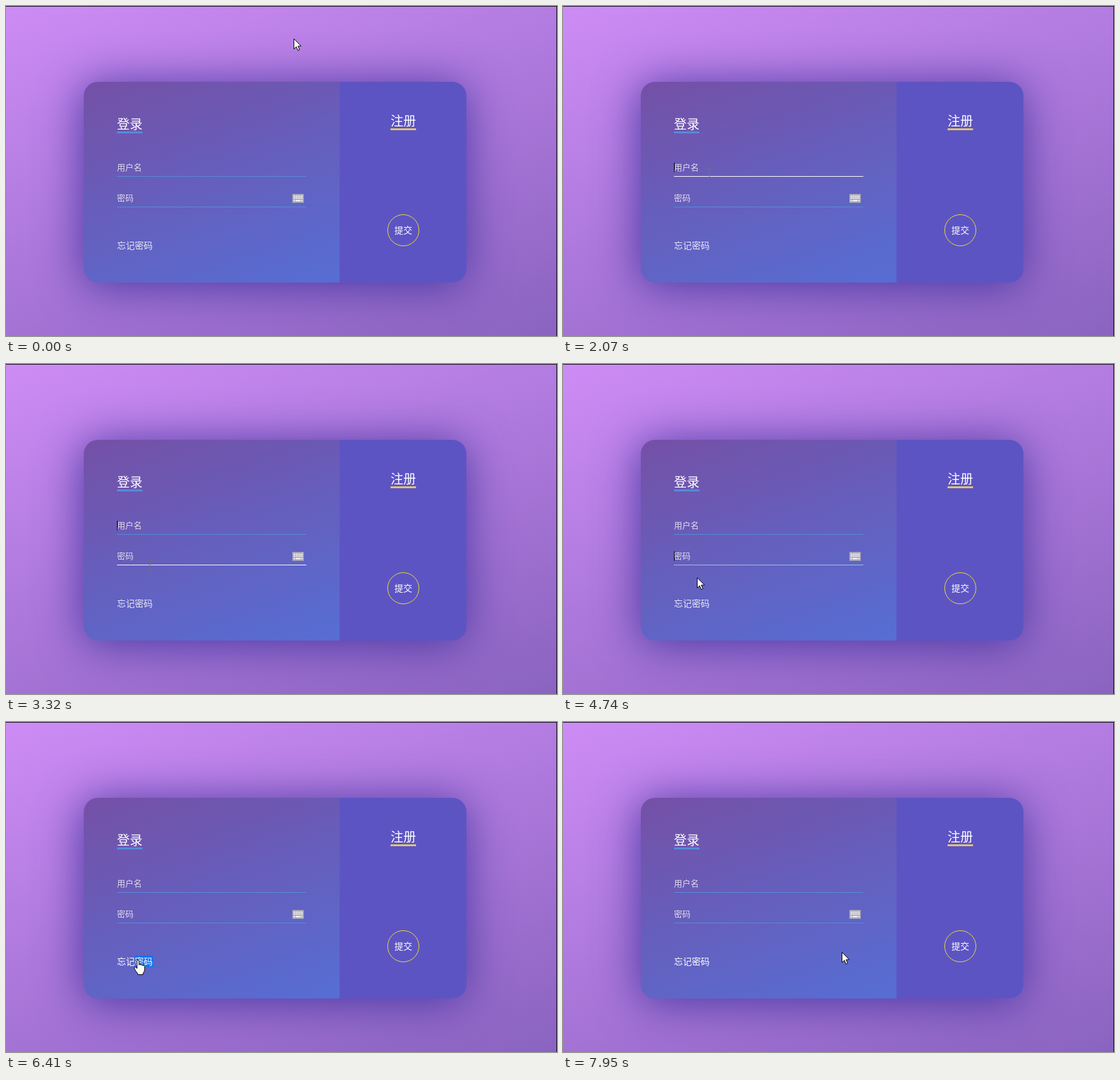
Write an HTML page that moves like this. It is 864 by 518 pixels and loops after 7990 ms.

```html
<!DOCTYPE html>
<html lang="zh-CN">
<head>
<meta charset="utf-8">
<title>登录</title>
<style>
html, body { margin: 0; width: 100%; height: 100%; overflow: hidden; }
body { position: relative; background: linear-gradient(160deg, #cd8cf5, #8a63c0); }
body::after { content: ""; position: absolute; inset: 0; border: solid #120c1c; border-width: 1px 1px 0 0; }
.card {
  position: absolute; left: 122px; top: 119px; width: 600px; height: 315px; border-radius: 22px;
  background: linear-gradient(160deg, #7550a6, #566ed4) 0 0 / 401px 100% no-repeat, #5d54c4;
  box-shadow: -2px 5px 70px #4638a0;
}
svg { position: absolute; left: 0; top: 0; font-family: "Noto Sans CJK SC", "Noto Sans CJK", sans-serif; }
.title { font-size: 20px; fill: #fff; }
.label { font-size: 13px; fill: #e0dcec; }
.link { font-size: 14px; fill: #fff; }
.menu { font-size: 12px; fill: #222; text-anchor: middle; }
.ink { fill: #fff; stroke: #000; stroke-linejoin: round; }
</style>
</head>
<body>
<div class="card"></div>
<svg width="864" height="518" viewBox="0 0 864 518">
  <text class="title" x="174" y="192.5">登录</text>
  <path d="M174 198.5h40" stroke="#568cd8" stroke-width="3"/>
  <text class="title" x="603" y="187.5">注册</text>
  <path d="M603 193.5h40" stroke="#dfc36c" stroke-width="3"/>

  <text class="label" x="174" y="258">用户名</text>
  <text class="label" x="174" y="306">密码</text>
  <path d="M174 267.5h297M174 315.5h297" stroke="#568cd8"/>
  <path id="line1" d="M174 267.5h297" stroke="#fff"/>
  <path id="line2" d="M174 315.5h297" stroke="#fff"/>
  <path id="caret" d="M174.5 0v15" stroke="#000"/>

  <rect x="449" y="295" width="18" height="14" fill="#a9a7b6"/>
  <path d="M451 298.5h14M451 301.5h14" stroke="#fff" stroke-width="2" stroke-dasharray="2 1"/>
  <path d="M451 305.5h2m1 0h8m1 0h2" stroke="#fff" stroke-width="2"/>

  <rect id="mark" y="366" height="19" fill="#1a73f0"/>
  <text id="forgot" class="link" x="174" y="381.3">忘记密码</text>

  <circle cx="623" cy="352" r="24.5" fill="none" stroke="#e8e02c"/>
  <text class="link" x="609" y="357.3">提交</text>

  <g id="menu">
    <rect x="212.5" y="335.5" width="196" height="25" fill="#fff" stroke="#cfcfd8"/>
    <path d="M269.5 336v24M326.5 336v24M383.5 336v24" stroke="#d4d4e0"/>
    <text class="menu" x="241" y="353.3">翻译</text>
    <text class="menu" x="298" y="353.3">复制</text>
    <text class="menu" x="355" y="353.3">搜索</text>
    <g fill="none" stroke="#777">
      <circle cx="396" cy="348" r="4.3" stroke-width="1.5"/>
      <circle cx="396" cy="348" r="5.5" stroke-width="1.6" stroke-dasharray="2.3 2.02"/>
    </g>
  </g>

  <g id="cursor">
    <path id="arrow" class="ink" d="M.5 .5V16.5L4.2 13 6.8 18.8 9.3 17.7 6.8 12H11.8Z"/>
    <path id="beam" d="M-3 -7.5h2.5l1 1 1-1h2.5M.5 -6.5v13M-3 7.5h2.5l1-1 1 1h2.5" fill="none" stroke="#77735f"/>
    <path id="hand" class="ink" d="M-1.5 14V2Q-1.5 .3 0 .3T1.5 2V8.5Q1.5 7 3 7T4.5 9Q4.5 7.8 6 7.8T7.5 9.8Q7.6 8.6 9 8.8T10.3 10.5V16Q10.3 19 8 21V23.5H-.5V21.5Q-3.5 18.5-5.5 14.5-6.4 12.5-5 11.7-3.5 11-1.5 14Z"/>
  </g>
</svg>
<script>
const LOOP = 7990, BLINK = 530;
const $ = id => document.getElementById(id);

// Pointer moves: begin, end, x, y; it rests in between
const moves = [
  [40, 810, 229, 262],
  [2590, 3320, 225, 316],
  [4580, 4740, 210, 335],
  [4740, 5270, 207, 373],
  [6930, 7140, 235, 385],
  [7140, 7460, 180, 415],
  [7460, 7700, 285, 416],
  [7700, 7950, 437, 361]
];

const within = (v, a, b) => v >= a && v < b;
const show = (id, on) => $(id).style.display = on ? "" : "none";
const progress = (t, a, b) => Math.min(1, Math.max(0, (t - a) / (b - a)));
const smooth = p => p * p * (3 - 2 * p);
const fade = (t, start) => 1 - (1 - progress(t, start, start + 500)) ** 2;

function pointer(t) {
  let x = 451, y = 51;
  for (const [begin, end, toX, toY] of moves) {
    const k = smooth(progress(t, begin, end));
    x += (toX - x) * k;
    y += (toY - y) * k;
  }
  return [Math.round(x), Math.round(y)];
}

function draw(t) {
  const [x, y] = pointer(t);
  const hand = within(x, 172, 233) && within(y, 364, 388);
  const beam = within(x, 172, 472) && (within(y, 244, 272) || within(y, 290, 324));
  $("cursor").setAttribute("transform", `translate(${x} ${y})`);
  show("hand", hand);
  show("beam", beam);
  show("arrow", !hand && !beam);

  $("line1").style.opacity = fade(t, 690) - fade(t, 2740);
  $("line2").style.opacity = fade(t, 2880) - fade(t, 4580);

  // The caret blinks from each click into a field
  const second = t >= 3530, focus = second ? 3530 : 1010;
  show("caret", within(t, focus, 5840) && Math.floor((t - focus) / BLINK) % 2 === 0);
  $("caret").setAttribute("transform", `translate(0 ${second ? 294 : 246})`);

  // Double click marks a word, the third click the whole line
  const whole = t >= 6530;
  show("mark", within(t, 6410, 7620));
  $("mark").setAttribute("x", whole ? 174 : 202);
  $("mark").setAttribute("width", whole ? 60 : 29);
  show("menu", within(t, 6570, 7620));
  $("forgot").style.fillOpacity = 0.86 + 0.14 * fade(t, 5000);
}

const start = performance.now();
function tick() {
  draw((performance.now() - start) % LOOP);
  requestAnimationFrame(tick);
}
tick();
</script>
</body>
</html>
```
